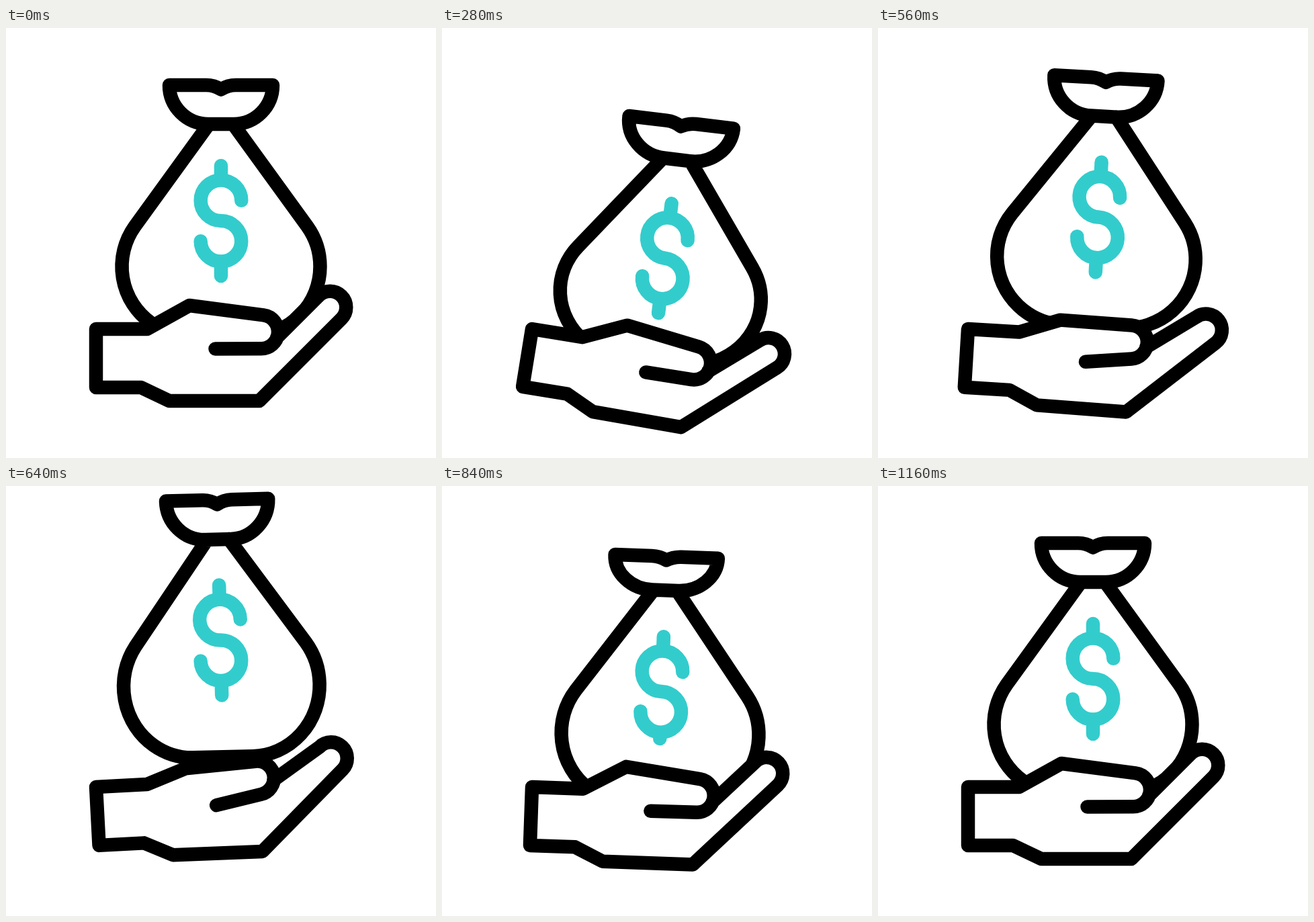
An HTML page with a canvas that plays this animation: 640x640 px, repeating every 1480 ms.

```html
<!DOCTYPE html>
<html lang="en">
<head>
<meta charset="utf-8">
<title>Money bag in hand</title>
<style>
  html, body { margin: 0; height: 100%; overflow: hidden; background: #fff; }
  canvas { display: block; width: 100vw; height: 100vh; }
</style>
</head>
<body>
<canvas id="stage" width="640" height="640"></canvas>
<script>
const c = document.getElementById('stage').getContext('2d');
const LOOP = 1480, STEP = 40, RAD = Math.PI / 180, Q = Math.PI / 2;
const WRIST = [134, 448];

// wrist, tilt, thumb: degrees; tall, mouth: height factors;
// slide, lift: bag offset from the hand; drop, finger: how far the hand flattens.
const rest = { wrist: 0, tilt: 0, slide: 0, lift: 0, tall: 1, mouth: 1,
  sign: 68, stem: 82, drop: 0, finger: 0, thumb: 0 };
const dip = { ...rest, wrist: 15.3, tilt: 11.4, slide: -12, lift: 19.5,
  tall: 0.932, mouth: 0.94, sign: 47, drop: 11.7, finger: 21 };
const toss = { ...rest, wrist: -3, tilt: -1.4, slide: 6, lift: -48,
  tall: 1.028, mouth: 1.015, drop: 7, finger: 8, thumb: -10.5 };
const land = { ...rest, wrist: 2, tilt: 2.1, slide: 1.4, lift: 7.5,
  tall: 1.009, mouth: 0.87, sign: 63, stem: 70 };

// Each move: start, end, from, to, and how late it gathers pace.
const moves = [
  [0, 440, rest, dip, 1.25],
  [440, 640, dip, toss, 1],
  [640, 840, toss, land, 1],
  [840, 1120, land, rest, 1]
];

function poseAt(t) {
  const move = moves.find(m => t < m[1]);
  if (!move) return rest;
  const [start, end, from, to, delay] = move;
  const u = ((t - start) / (end - start)) ** delay;
  const k = u * u * (3 - 2 * u);
  const p = {};
  for (const name in rest) p[name] = from[name] + (to[name] - from[name]) * k;
  return p;
}

// Path points added inside keep their place after the frame is left.
function frame(x, y, deg, draw) {
  c.save();
  c.translate(x, y);
  c.rotate(deg * RAD);
  draw();
  c.restore();
}

function drawBag(p) {
  const wide = 1 + 0.4 * (1 - p.tall);
  const neck = 18 + 55 * (1 - p.tall);
  c.beginPath();
  c.save();
  c.scale(wide, p.tall);
  c.moveTo(-neck, -212);
  c.arc(-44.5, 0, 103, Math.PI + 0.62, Q, true);
  c.arc(44.5, 0, 103, Q, -0.62, true);
  c.lineTo(neck, -212);
  c.translate(0, -212);
  c.scale(1, p.mouth / p.tall);
  c.moveTo(-77, -58);
  c.lineTo(-22, -58);
  c.quadraticCurveTo(-10, -58, 0, -51.5);
  c.quadraticCurveTo(10, -58, 22, -58);
  c.lineTo(77, -58);
  c.arc(19, -58, 58, 0, Q);
  c.arc(-19, -58, 58, Q, 2 * Q);
  c.closePath();
  c.restore();
  c.strokeStyle = '#000';
  c.stroke();
}

function drawSign(p) {
  const r = 30.3;
  c.translate(0, -p.sign);
  c.beginPath();
  c.moveTo(0, -82);
  c.lineTo(0, -2 * r);
  c.moveTo(r, -r);
  c.arc(0, -r, r, 0, Q, true);
  c.arc(0, r, r, -Q, 2 * Q);
  c.moveTo(0, 2 * r);
  c.lineTo(0, p.stem);
  c.strokeStyle = '#3cc';
  c.stroke();
}

function drawHand(p) {
  const inThumb = draw => frame(177.5, 29.5 + p.drop, p.thumb, draw);
  const r = 24;
  const heel = [243 - 0.1 * p.drop, 107 + 0.25 * p.drop];
  const tip = [348.3 + 0.4 * p.finger, -32.3 + p.finger];
  const dx = tip[0] - heel[0], dy = tip[1] - heel[1];
  const aim = Math.atan2(dy, dx) + Math.asin(r / Math.hypot(dx, dy));

  c.beginPath();
  inThumb(() => c.moveTo(91.5, -16.5));
  c.arc(...tip, r, aim - Q, aim + Q);
  c.lineTo(...heel);
  c.lineTo(109, 107);
  c.lineTo(67, 87);
  c.lineTo(0, 87);
  c.lineTo(0, 0);
  c.lineTo(76, 0);
  c.lineTo(139 + 0.4 * p.thumb, -35 + p.drop - 0.7 * p.thumb);
  inThumb(() => {
    c.arc(68.5, -25.3, 25, -1.44, Q);
    c.lineTo(0, 0);
  });
  c.fillStyle = '#fff';
  c.fill();
  c.strokeStyle = '#000';
  c.stroke();
}

function draw() {
  const t = Math.floor(performance.now() % LOOP / STEP) * STEP;
  const p = poseAt(t);
  c.fillStyle = '#fff';
  c.fillRect(0, 0, 640, 640);
  c.lineWidth = 20.5;
  c.lineCap = c.lineJoin = 'round';

  // The bag rides on the turning hand but keeps its own tilt.
  frame(...WRIST, p.wrist, () => {
    c.translate(186, -93);
    c.rotate(-p.wrist * RAD);
    c.translate(p.slide, p.lift);
    c.rotate(p.tilt * RAD);
    drawBag(p);
    drawSign(p);
  });
  frame(...WRIST, p.wrist, () => drawHand(p));
  requestAnimationFrame(draw);
}
draw();
</script>
</body>
</html>
```
